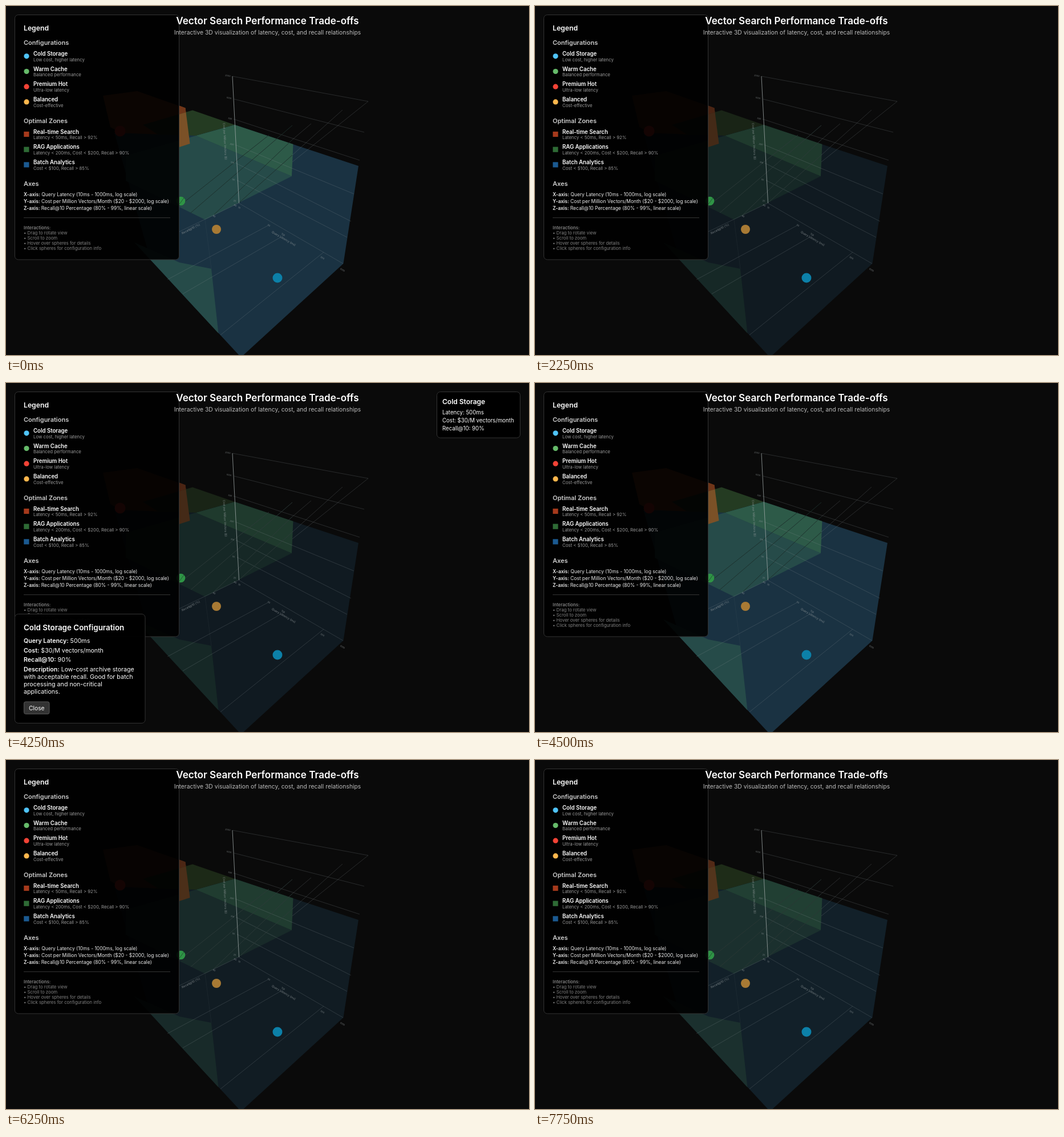
Recreate the animation shown at these times as an HTML page. Size 917 px wide and 611 px high, loop 8000 ms.

```html
<!DOCTYPE html>
<html lang="en">
<head>
<meta charset="utf-8">
<title>Vector Search Performance Trade-offs</title>
<style>
html, body { margin: 0; width: 100%; height: 100%; overflow: hidden; background: #0a0a0a; }
svg { display: block; width: 917px; height: 611px; font-family: Inter, sans-serif; }
text { white-space: pre; }
.scene { animation: glow 8s step-end infinite; }
.blue { fill: var(--b); }
.teal { fill: var(--t); }
.mid { fill: var(--m); }
.green { fill: var(--g); }
.orange { fill: var(--o); }
.amber { fill: var(--p); }
.grid { stroke: #8a9496; stroke-opacity: .3; stroke-width: .8; fill: none; }
.rays { stroke: var(--r); stroke-width: .9; fill: none; }
.tiny { fill: #9aa0a2; opacity: .75; }
.box { stroke: #333; }
.popup { animation: popup 8s step-end infinite; }

/* zone opacity levels */
@keyframes glow {
  0%, 56.25% { --b: #1a3242; --t: #264b49; --m: #2d5a48; --g: #243b22; --o: #6f3619; --p: #7b5127; --r: #1c2e2b; }
  25%, 53.125% { --b: #101a21; --t: #162826; --m: #1f3a2d; --g: #192416; --o: #4a2413; --p: #442a17; --r: #2d3a39; }
  31.25% { --b: #182d3b; --t: #244541; --m: #2c5743; --g: #233921; --o: #6b3418; --p: #754d25; --r: #1b2a26; }
  59.375% { --b: #111c23; --t: #182a29; --m: #203c30; --g: #1c2917; --o: #4c2614; --p: #4b2f19; --r: #2d3a39; }
  87.5% { --b: #122029; --t: #1b302e; --m: #213f33; --g: #1e2c18; --o: #522916; --p: #53351c; --r: #2b3735; }
}
@keyframes popup {
  0%, 56.25%, 100% { visibility: hidden; }
  31.25% { visibility: visible; }
}
</style>
</head>
<body>
<svg viewBox="0 0 917 611">
  <rect width="917" height="611" fill="#0a0a0a"/>

  <g class="scene">
    <path class="orange" d="M170 157L230 149L314.500 178.500L322.500 241L266 259L183 212Z"/>
    <path class="green" d="M240 208L327 182.500L401 208L333 227L290 240Z"/>
    <path class="blue" d="M190 222L333 227L401 208L503 242L618 280L591.500 451L412 615L253 444Z"/>
    <path class="teal" d="M210 262L333 227L501 298L349 374L210 306Z"/>
    <path class="mid" d="M333 227L401 208L503.500 242L501 298Z"/>
    <path class="teal" d="M225 414L304 449L360 460L372.500 573L253 444Z"/>
    <path class="orange" d="M304 174.500L314.500 178.500L315.500 186L304 189.500Z"/>
    <path class="amber" d="M304 189.500L315.500 186L322.500 241L304 247Z"/>

    <path class="grid" d="M349 374L360 460" opacity=".35"/>
    <path class="grid" d="M397 123L635 167M400 163L628 221M399 198L620 270M402 243L610 329M403 275L605 377M405 305L598 405
      M408 345L591 451M408 345L304 395M283 479L460 384M310 504L488 401M376 576L557 431M502 273L635 167
      M502 234L535 206M502 261L590 182"/>
    <path class="rays" d="M304 350L461 226M324 362L502 209M365 365L502 234M408 345L502 261"/>
    <path d="M397 123L408.500 345" stroke="#a4adac" stroke-opacity=".75" stroke-width="1"/>

    <circle cx="200" cy="219" r="9.500" fill="#c62b20"/>
    <circle cx="306.500" cy="341.500" r="7.800" fill="#2f9446"/>
    <path d="M304 347L312 336" stroke="#1c4a2c" stroke-width=".8"/>
    <circle cx="369" cy="391" r="8" fill="#a87a34"/>
    <circle cx="476" cy="476" r="8.500" fill="#0c80a8"/>
  </g>
  <g id="labels" class="tiny"></g>

  <rect class="box" x="15.500" y="15.500" width="288" height="428.500" rx="6" fill="#000" fill-opacity=".9"/>
  <path d="M31 370.700H288" stroke="#383838"/>
  <g id="legend"></g>

  <g class="popup">
    <rect class="box" x="755.500" y="15.500" width="146" height="80.500" rx="6" fill="#000" fill-opacity=".95"/>
    <rect class="box" x="15.500" y="404.500" width="228.500" height="191" rx="6" fill="#000" fill-opacity=".96"/>
    <rect x="31.500" y="558" width="44.500" height="21.500" rx="3" fill="#333" stroke="#555"/>
    <g id="details"></g>
  </g>
</svg>

<script>
const NS = "http://www.w3.org/2000/svg";

function add(parent, tag, attrs) {
  const el = document.createElementNS(NS, tag);
  for (const key in attrs) el.setAttribute(key, attrs[key]);
  return document.getElementById(parent).appendChild(el);
}

// y is the middle of the capitals; text between asterisks is bold
function text(parent, str, x, y, size, fill = "#fff", weight = 400, extra = {}) {
  const el = add(parent, "text", {
    x, y: y + size * .364, "font-size": size, fill, "font-weight": weight, ...extra
  });
  str.split("*").forEach((part, i) => {
    const span = document.createElementNS(NS, "tspan");
    span.textContent = part;
    if (i % 2) span.setAttribute("font-weight", 600);
    el.append(span);
  });
}

function tilted(str, x, y, angle, size) {
  text("labels", str, x, y, size, "#9aa0a2", 400,
    { "text-anchor": "middle", transform: `rotate(${angle} ${x} ${y})` });
}

const middle = { "text-anchor": "middle" };
text("legend", "Vector Search Performance Trade-offs", 458.5, 26, 17.1, "#fff", 600, middle);
text("legend", "Interactive 3D visualization of latency, cost, and recall relationships",
  458.5, 46, 10.35, "#bbb", 400, middle);

text("legend", "Legend", 31, 38.500, 12.2, "#fff", 600);
[["Configurations", 63.5], ["Optimal Zones", 200.5], ["Axes", 310.5]]
  .forEach(([name, y]) => text("legend", name, 31, y, 11, "#ccc", 600));

function item(name, note, y) {
  text("legend", name, 48, y - 4.5, 9.65, "#fff", 600);
  text("legend", note, 48, y + 6, 7.8, "#999");
}

[
  ["Cold Storage", "Low cost, higher latency", "#4fc3f7"],
  ["Warm Cache", "Balanced performance", "#66bb6a"],
  ["Premium Hot", "Ultra-low latency", "#f44336"],
  ["Balanced", "Cost-effective", "#ffb74d"]
].forEach(([name, note, fill], i) => {
  const y = 87.8 + i * 26.7;
  add("legend", "circle", { cx: 36, cy: y, r: 4.6, fill });
  item(name, note, y);
});

[
  ["Real-time Search", "Latency < 50ms, Recall > 92%", "#a63a1c"],
  ["RAG Applications", "Latency < 200ms, Cost < $200, Recall > 90%", "#2e6b35"],
  ["Batch Analytics", "Cost < $100, Recall > 85%", "#1b5a91"]
].forEach(([name, note, fill], i) => {
  const y = 224.5 + i * 26.7;
  add("legend", "rect", { x: 31.3, y: y - 4.6, width: 9.2, height: 9.2, fill });
  item(name, note, y);
});

[
  "*X-axis:* Query Latency (10ms - 1000ms, log scale)",
  "*Y-axis:* Cost per Million Vectors/Month ($20 - $2000, log scale)",
  "*Z-axis:* Recall@10 Percentage (80% - 99%, linear scale)"
].forEach((line, i) => text("legend", line, 31, 330 + i * 11.9, 8.46, "#eee"));

[
  "*Interactions:*",
  "• Drag to rotate view",
  "• Scroll to zoom",
  "• Hover over spheres for details",
  "• Click spheres for configuration info"
].forEach((line, i) => text("legend", line, 31, 387.7 + i * 9.2, 7.8, "#808080"));

text("details", "Cold Storage", 765, 32.5, 12, "#fff", 600);
["Latency: 500ms", "Cost: $30/M vectors/month", "Recall@10: 90%"]
  .forEach((line, i) => text("details", line, 765, 51.7 + i * 13.8, 9.65));

text("details", "Cold Storage Configuration", 31, 428.5, 13.4, "#fff", 600);
[
  ["*Query Latency:* 500ms", 451],
  ["*Cost:* $30/M vectors/month", 467.7],
  ["*Recall@10:* 90%", 484.5],
  ["*Description:* Low-cost archive storage", 501.3],
  ["with acceptable recall. Good for batch", 514.3],
  ["processing and non-critical", 527.3],
  ["applications.", 540.3]
].forEach(([line, y]) => text("details", line, 31, y, 10.65));
text("details", "Close", 53.8, 569, 10.3, "#fff", 400, middle);

[
  ["2000", 389, 122], ["1000", 391, 161], ["500", 393, 197], ["200", 396, 242],
  ["100", 397, 274], ["50", 399, 304], ["20", 401, 341]
].forEach(([n, x, y]) => tilted(n, x, y, 10, 3.8));
[
  ["10", 409, 353], ["80", 402, 349], ["50", 461, 384], ["100", 486, 400],
  ["500", 555, 441], ["1000", 590, 462], ["85", 365, 368]
].forEach(([n, x, y]) => tilted(n, x, y, 30, 4));
tilted("Query Latency (ms)", 487, 407, 30, 5.1);
tilted("Recall@10 (%)", 324, 390, -27, 5.2);
tilted("Cost per Million Vectors ($)", 384, 237, 87, 5);
</script>
</body>
</html>
```
